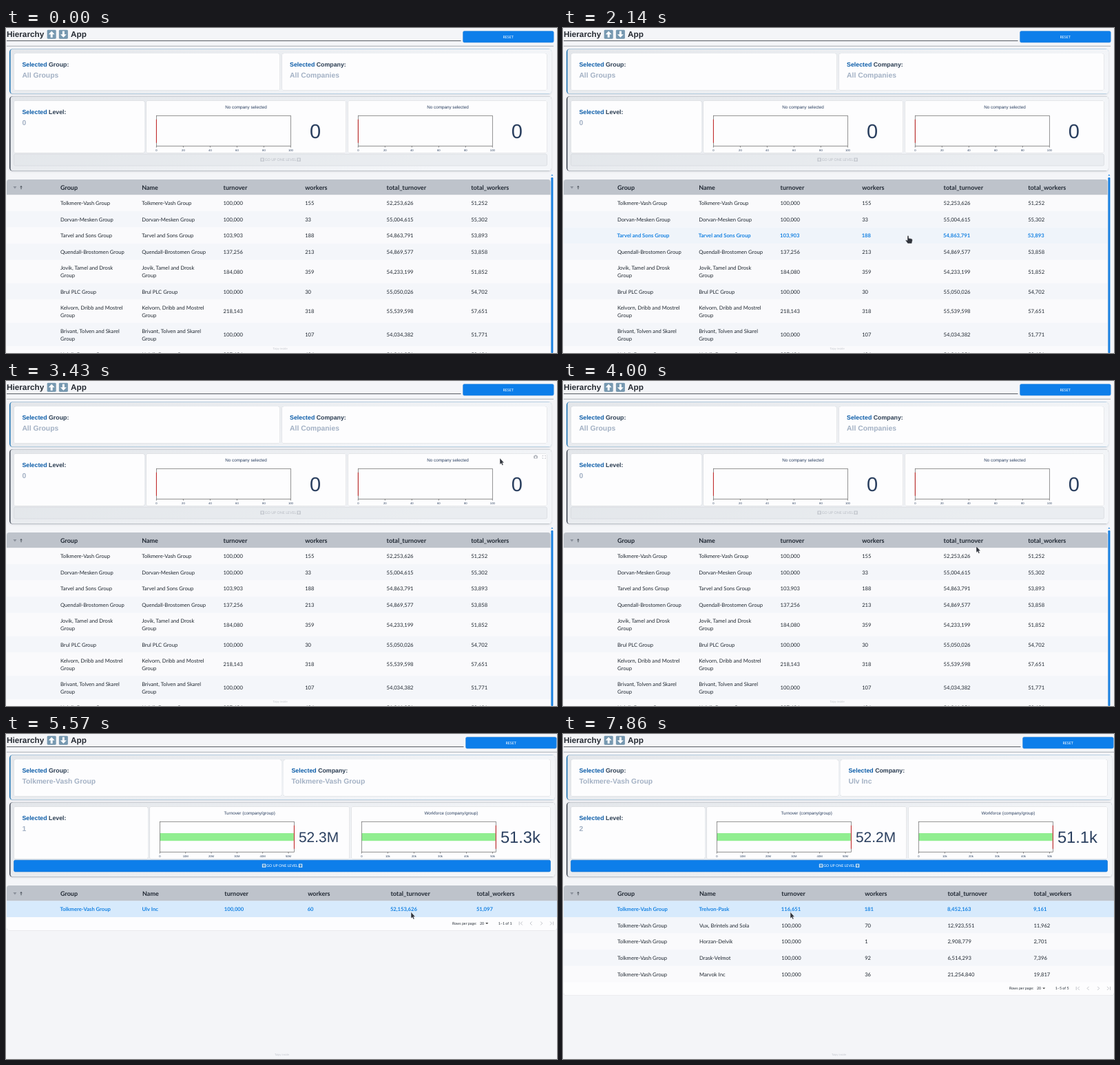
Recreate the animation shown at these times as an HTML page. Size 800x472 px, loop 8 s.

```html
<!DOCTYPE html>
<html lang="en">
<head>
<meta charset="utf-8">
<title>Hierarchy App</title>
<style>
html, body { margin: 0; width: 100%; height: 100%; overflow: hidden; background: #f4f5f8; }
svg { display: block; width: 100vw; height: 100vh; }
text { font-family: Lato, sans-serif; font-size: 7.65px; fill: #1f2730; text-rendering: geometricPrecision; white-space: pre; }
.title, .label, .value { font-family: "Liberation Sans", Arial, sans-serif; font-weight: 700; }
.title { font-size: 11.75px; fill: #262b33; }
.label { font-size: 8.8px; fill: #2b3d52; }
.label tspan { fill: #0b5ca8; }
.value { font-size: 10.35px; fill: #a3b1c4; }
.plot { font-family: "Liberation Sans", Arial, sans-serif; fill: #2a3f5f; }
.head { font-size: 9px; font-weight: 700; fill: #202833; }
.hot { font-weight: 700; fill: #1682e2; }
.small { font-size: 5.3px; }
.mid { text-anchor: middle; }
.card { fill: #fdfdfe; filter: drop-shadow(0 .9px .6px rgba(45, 52, 65, .36)); }
.panel { filter: drop-shadow(0 1px 1.6px rgba(60, 70, 90, .16)); }
</style>
</head>
<body>
<svg id="stage" viewBox="0 0 800 472" preserveAspectRatio="none">
  <defs>
    <linearGradient id="panel" x2="1" y2=".35">
      <stop offset="0" stop-color="#e3e6ea"/><stop offset="1" stop-color="#f4f6f9"/>
    </linearGradient>
  </defs>
  <g id="scene"></g>
</svg>
<script>
const LOOP = 8000, STEPS = 56;
const OPEN_GROUP = 37, OPEN_COMPANY = 51, PRESS = 34;
const BLUE = '#0d7eea';
const ROOT = 'Tolkmere-Vash Group';

// Cursor path: step, x, y
const PATH = [
  [1, 690, 12], [4, 560, 75], [8, 455, 150], [11, 480, 300], [12, 498, 440],
  [14, 501, 350], [15, 501, 301.5], [16, 501, 310], [18, 502.5, 385], [19, 502.5, 389.8],
  [20, 505, 450], [21, 520, 440], [23, 690, 150], [24, 717, 112], [25, 717, 112],
  [27, 640, 60], [29, 560, 420], [31, 570, 455], [33, 585, 285], [34, 588, 258.6],
  [39, 588, 258.6], [42, 560, 120], [45, 420, 150], [48, 335, 232], [49, 330, 258.6], [56, 330, 258.6]
];

const COLUMNS = ['Group', 'Name', 'turnover', 'workers', 'total_turnover', 'total_workers'];
const group = (name, ...cells) => [name, name, ...cells];
const VIEWS = [
  {
    group: 'All Groups', company: 'All Companies',
    rows: [
      group(ROOT, '100,000', '155', '52,253,626', '51,252'),
      group('Dorvan-Mesken Group', '100,000', '33', '55,004,615', '55,302'),
      group('Tarvel and Sons Group', '103,903', '188', '54,863,791', '53,893'),
      group('Quendall-Brostomen Group', '137,256', '213', '54,869,577', '53,858'),
      group('Jovik, Tamel and Drosk\nGroup', '184,080', '359', '54,233,199', '51,852'),
      group('Brul PLC Group', '100,000', '30', '55,050,026', '54,702'),
      group('Kelvorn, Dribb and Mostrel\nGroup', '218,143', '318', '55,539,598', '57,651'),
      group('Brivant, Tolven and Skarel\nGroup', '100,000', '107', '54,034,382', '51,771'),
      group('Nelvik-Drumm Group', '237,426', '424', '51,861,251', '53,431')
    ]
  },
  {
    group: ROOT, company: ROOT, figures: ['52.3M', '51.3k'],
    rows: [[ROOT, 'Ulv Inc', '100,000', '60', '52,153,626', '51,097']]
  },
  {
    group: ROOT, company: 'Ulv Inc', figures: ['52.2M', '51.1k'],
    rows: [
      [ROOT, 'Trelvon-Pask', '116,651', '181', '8,452,163', '9,161'],
      [ROOT, 'Vux, Brintels and Sola', '100,000', '70', '12,923,551', '11,962'],
      [ROOT, 'Horzan-Delvik', '100,000', '1', '2,908,779', '2,701'],
      [ROOT, 'Drask-Velmot', '100,000', '92', '6,514,293', '7,396'],
      [ROOT, 'Marvok Inc', '100,000', '36', '21,254,840', '19,817']
    ]
  }
];

const text = (x, y, str, cls = '', extra = '') => `<text x="${x}" y="${y}" class="${cls}" ${extra}>${str}</text>`;
const box = (x1, y1, x2, y2, fill, extra = '') =>
  `<rect x="${x1}" y="${y1}" width="${x2 - x1}" height="${y2 - y1}" fill="${fill}" ${extra}/>`;
const path = (d, stroke, width = 1, extra = 'fill="none"') =>
  `<path d="${d}" stroke="${stroke}" stroke-width="${width}" ${extra}/>`;
const card = (x1, y1, x2, y2) => box(x1, y1, x2, y2, '#fdfdfe', 'rx="3" class="card"');

function arrowTile(x, y, size, fill, arrow, down) {
  const turn = down ? `rotate(180 ${x + size / 2} ${y + size / 2})` : '';
  return `<g transform="${turn} translate(${x} ${y}) scale(${size / 14})">` +
    box(0, 0, 14, 14, fill, 'rx="1.6"') +
    `<path d="M7 2L11.8 7H8.6V12H5.4V7H2.2Z" fill="${arrow}"/></g>`;
}

function panel(y1, y2, right, edge) {
  return box(5, y1, right, y2, edge, 'rx="4.5" class="panel"') +
    box(6.5, y1, right, y2, 'url(#panel)', 'rx="4"');
}

const selection = (x, y, what, value) =>
  text(x, y, `<tspan>Selected</tspan> ${what}:`, 'label') + text(x, y + 16.3, value, 'value');

function header(shift) {
  const left = shift ? 667.5 : 663.5;
  return text(1, 13.2, 'Hierarchy', 'title') + arrowTile(59.7, 2.7, 13, '#7698b0', '#fff') +
    arrowTile(76.9, 2.7, 13, '#7698b0', '#fff', true) + text(94, 13.2, 'App', 'title') +
    path(`M1 18.6H${left - 3}`, '#555a61', 1) + path(`M1 26.3H${795 + shift}`, '#a4a8af', .9) +
    box(left, 4.6, left + 131.7, 21, BLUE, 'rx="2" stroke="#3d8fdc" stroke-width=".6"') +
    text(left + 65.6, 14.8, 'RESET', 'small mid', 'style="fill:#fff"');
}

function plot(x, index, figure) {
  const right = x + 195, max = figure ? [52.25, 51.25][index] : 100;
  const unit = figure ? 'Mk'[index] : '', tick = figure ? 10 : 20;
  const name = figure ? ['Turnover', 'Workforce'][index] + ' (company/group)' : 'No company selected';
  const mark = figure ? right : x;
  let out = text(x + 130.2, 116.6, name, 'plot mid', 'style="font-size:6.3px"');
  if (figure) out += box(x, 144, right - .6, 155.2, '#90ee90');
  out += box(x, 127.3, right, 171.4, 'none', 'stroke="#666" stroke-width=".7"');
  for (let v = 0; v <= max; v += tick) {
    const tx = x + 195 * v / max;
    out += path(`M${tx} 171.4v2.2`, '#555', .7) +
      text(tx, 178.8, v ? v + unit : 0, 'plot mid', 'style="font-size:4.2px"');
  }
  out += path(`M${mark} 132.8V166.8`, '#c62222', 1);
  const [size, base] = !figure ? [29, 160] : index ? [23.7, 158] : [20.9, 157.2];
  return out + text(x + 230.6, base, figure || 0, 'plot mid', `style="font-size:${size}px"`);
}

// Toolbar shown while the cursor is over a plot
const plotTools = right =>
  box(right - 19.3, 108.4, right - 13.7, 112.6, '#a9adb5', 'rx=".8"') +
  box(right - 17.8, 107.6, right - 15.2, 109, '#a9adb5') +
  `<circle cx="${right - 16.5}" cy="110.6" r="1.3" fill="#fff"/>` +
  path(`M${right - 6.5} 109.6v-1.3h1.3m1.8 0h1.3v1.3m0 1.6v1.3h-1.3m-1.8 0h-1.3v-1.3`, '#b9bcc4', .7);

function goUp(right, active) {
  const mid = (11.5 + right) / 2;
  const ink = active ? '#fff' : '#b9bdc5';
  const tile = x => arrowTile(x, 188.4, 5.6, active ? '#b9d9f5' : '#c6cad1', active ? '#2578bd' : '#eceef1');
  return box(11.5, 183.2, right, 200, active ? BLUE : 'rgba(226,229,234,.5)',
    `rx="2" stroke="${active ? '#0b6dcb' : '#d2d5da'}" stroke-width=".6"`) +
    tile(mid - 29.2) + tile(mid + 23.8) +
    text(mid, 193.1, 'GO UP ONE LEVEL', 'small mid', `style="fill:${ink}"`);
}

function layoutRows(rows) {
  let top = 242.4;
  return rows.map(cells => {
    const height = cells[0].includes('\n') ? 33.9 : 23.6;
    const row = { cells, top, bottom: top + height };
    top += height;
    return row;
  });
}

function tableRow(row, index, xs, right, tint) {
  const mid = (row.top + row.bottom) / 2 + 3;
  const fill = tint || (index % 2 ? '#f4f6fa' : '#fafafc');
  return box(1, row.top, right, row.bottom, fill) + row.cells.map((cell, c) => {
    const lines = cell.split('\n');
    return lines.map((line, n) =>
      text(xs[c] - (tint ? .5 : 0), mid + (n - (lines.length - 1) / 2) * 11, line, tint ? 'hot' : '')).join('');
  }).join('');
}

function pager(y, count) {
  const base = y + 1.9;
  return text(648, base, 'Rows per page:', 'small') + text(688, base, '20', 'small') +
    `<path d="M696.2 ${y - 1}h4l-2 2.2z" fill="#444"/>` + text(714.8, base, `1–${count} of ${count}`, 'small') +
    path(`M745.2 ${y - 2.5}v5m4.6-5l-2.5 2.5 2.5 2.5M763.5 ${y - 2.5}l-2.5 2.5 2.5 2.5` +
      `M776.2 ${y - 2.5}l2.5 2.5-2.5 2.5M790 ${y - 2.5}l2.5 2.5-2.5 2.5m4.6-5v5`, '#b4b7bd', .8);
}

function table(level, rows, hover, tint) {
  const right = level ? 800 : 790.5;
  const xs = level ? [79, 198, 317.3, 438.2, 558.4, 683.4] : [79, 197.2, 315.6, 434.2, 552.6, 675.2];
  const end = rows[rows.length - 1].bottom;
  let out = box(1, 220, right, level ? end + 19.3 : 480, '#fafafc', 'rx="4" class="card"');
  out += `<path d="M1 242.4V224q0-4 4-4H${right - 4}q4 0 4 4V242.4Z" fill="#bec3cb"/>` +
    '<path d="M10.4 230h5l-2.5 3.4z" fill="#8b919b"/>' + path('M22 229.6v4.6m-1.3-3l1.3-1.6 1.3 1.6', '#3f4650', .9) +
    COLUMNS.map((name, c) => text(xs[c], 234.9, name, 'head')).join('');
  out += rows.map((row, i) => tableRow(row, i, xs, right, i === hover && tint)).join('');
  if (level) return out + pager(end + 9, rows.length);
  return out + box(791.4, 217, 794.4, 472, '#177fe0', 'rx="1.2"') +
    '<path d="M791.4 214.4h3l-1.5-2z" fill="#177fe0"/>';
}

function cursorAt(step) {
  if (step < 1) return null;
  const i = PATH.findIndex(p => p[0] >= step);
  const [k2, x2, y2] = PATH[i], [k1, x1, y1] = PATH[i - 1] || PATH[i];
  const f = k2 > k1 ? (step - k1) / (k2 - k1) : 1;
  return { x: x1 + (x2 - x1) * f, y: y1 + (y2 - y1) * f };
}

const ARROW = 'M0 0V9.2L2 7.4 3.5 10.5 5 9.8 3.6 6.8H6.2Z';
const HAND = 'M-1 .8Q0-.6 1 .8V3.8L5 4.6Q6.6 5 6.4 6.8L5.4 11.5H-.4L-3.6 7.2Q-3.4 5.6-1 7Z';
const pointer = ({ x, y }, hand) =>
  `<g transform="translate(${x} ${y})">${path(hand ? HAND : ARROW, '#fff', .4, 'fill="#30343c"')}</g>`;

const rowAt = (rows, p) => p && p.x < 790 ? rows.findIndex(r => p.y >= r.top && p.y < r.bottom) : -1;
const levelAt = step => step >= OPEN_COMPANY ? 2 : step >= OPEN_GROUP ? 1 : 0;

function draw(step) {
  const level = levelAt(step), view = VIEWS[level], shift = level ? 5 : 0;
  const rows = layoutRows(view.rows), cursor = cursorAt(step);
  const hover = rowAt(rows, cursor);
  const settled = hover === rowAt(rows, cursorAt(step - 1));
  const tint = step >= PRESS ? '#d7eafc' : settled ? '#e2f0fa' : '#eff4fa';
  const edge = 785.5 + shift, split = level ? 400 : 397.6;
  const plots = [203.6 + shift, 496.5 + shift];

  let out = header(shift) + panel(30.5, 95.6, 792 + shift, '#1b72b2') + panel(99.2, 207.6, 792 + shift, '#3b4350');
  out += card(11.5, 37, split, 90.6) + card(split + 3, 37, edge, 90.6) +
    selection(23.4, 56, 'Group', view.group) + selection(split + 14.5, 56, 'Company', view.company);
  out += goUp(edge, level > 0) + card(11.5, 105.5, 201 + shift, 181.4) + selection(23.4, 125, 'Level', level);
  plots.forEach((x, i) => {
    const right = i ? edge : x + 290;
    out += card(x, 105.5, right, 181.4) + plot(x + 14.8, i, view.figures && view.figures[i]);
    if (cursor && cursor.x > x && cursor.x < right && cursor.y > 105 && cursor.y < 181) out += plotTools(right);
  });
  out += table(level, rows, hover, tint) +
    text(398 + shift / 2, 467, 'Taipy inside', 'mid', 'style="font-size:4.2px;fill:#c6c9d0"');
  if (!level && step > PRESS) out += path('M791.5 459.4a2.6 2.6 0 0 0 0 5', '#8a9099', .8);
  if (cursor) out += pointer(cursor, hover >= 0 && step < PRESS);
  document.getElementById('scene').innerHTML = out;
}

const start = performance.now();
let shown = -1;
function tick() {
  const time = (performance.now() - start) % LOOP;
  const step = Math.min(STEPS - 1, Math.floor((time + 3) * STEPS / LOOP));
  if (step !== shown) draw(shown = step);
  requestAnimationFrame(tick);
}
tick();
</script>
</body>
</html>
```
